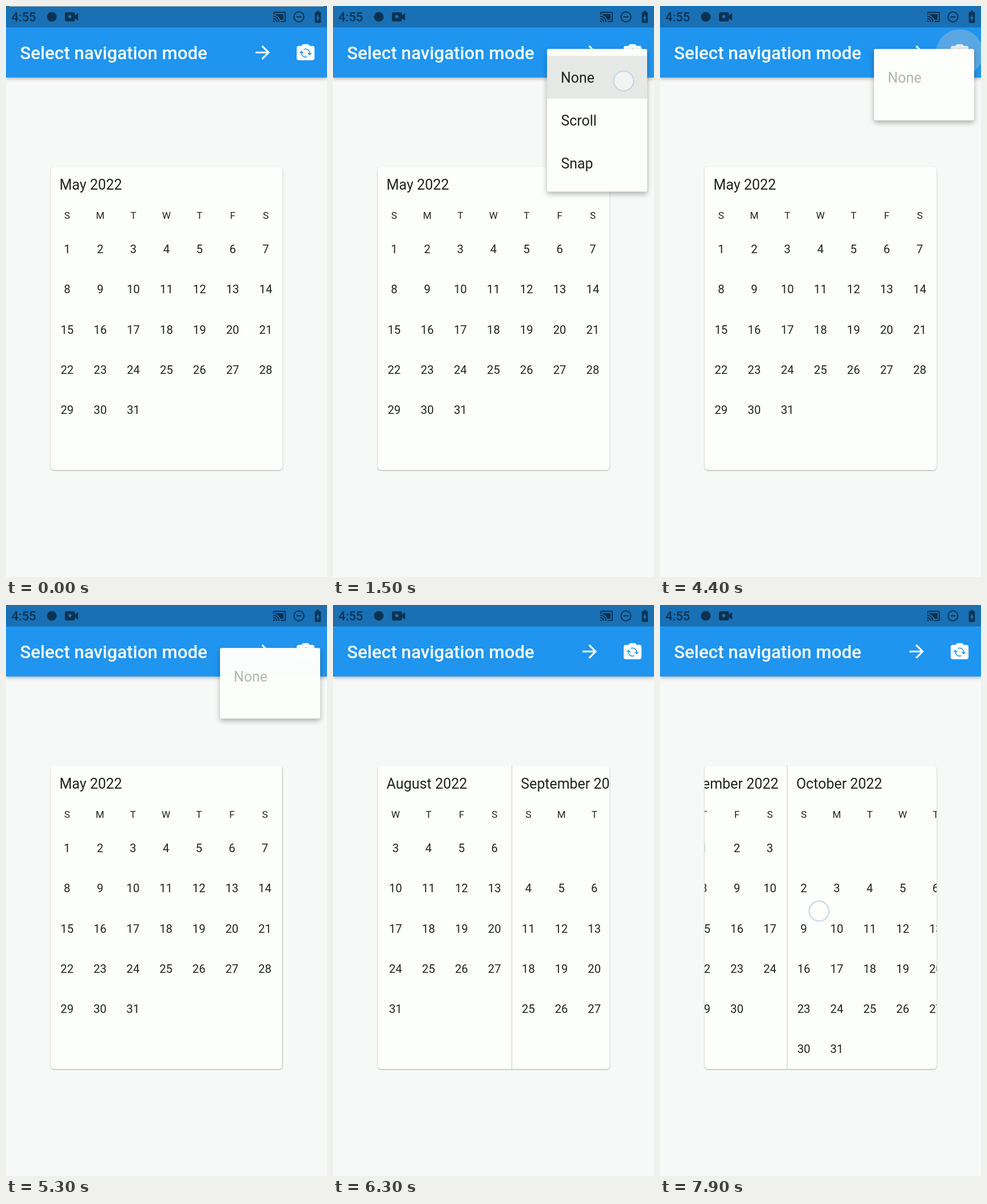
An HTML page for the animation above (8 s loop, 561 by 998 pixels).

```html
<!DOCTYPE html>
<html lang="en">
<head>
<meta charset="utf-8">
<title>Calendar navigation mode</title>
<style>
  html, body { margin: 0; width: 100%; height: 100%; overflow: hidden; background: #f7f9f8; }
  svg { display: block; width: 100%; height: 100%; font-family: Roboto, sans-serif; fill: #212221; }
  .card { fill: #fdfffc; filter: drop-shadow(0 1px 1.2px rgba(0,0,0,.32)); }
  .bar { fill: #1f95f0; filter: drop-shadow(0 2px 3px rgba(0,0,0,.3)); }
  .status { fill: #0d3250; }
  .white { fill: #fdfffe; }
  .mid { text-anchor: middle; }
  .menu { fill: #fdfffc; filter: drop-shadow(0 4px 5px rgba(0,0,0,.3)); }
</style>
</head>
<body>
<svg viewBox="0 0 561 998" preserveAspectRatio="none">
  <defs>
    <clipPath id="cardClip"><rect x="78" y="281" width="405.5" height="530" rx="6"/></clipPath>
    <clipPath id="barClip"><rect width="561" height="125"/></clipPath>
    <clipPath id="menuClip"><rect id="menuCut" y="75" rx="3"/></clipPath>
  </defs>

  <rect width="561" height="998" fill="#f7f9f8"/>
  <rect class="card" x="78" y="281" width="405.5" height="530" rx="6"/>
  <g id="months" clip-path="url(#cardClip)"></g>

  <rect class="bar" width="561" height="125"/>
  <rect width="561" height="37.5" fill="#1970b5"/>
  <rect id="edge" x="6" width="549" height="1" fill="#b4c3cf"/>
  <g class="status">
    <text x="9.500" y="27.300" font-size="21.800" font-weight="500">4:55</text>
    <circle cx="80" cy="19" r="8.500"/>
    <path fill-rule="evenodd" d="M106 11h11.500a3 3 0 0 1 3 3v2.500l5.500-4v13l-5.500-4v2.500a3 3 0 0 1-3 3H106a3 3 0 0 1-3-3V14a3 3 0 0 1 3-3zM111.500 15.500a3 3 0 1 0 .01 0z"/>
    <path transform="translate(466 7)" d="M1 18v3h3c0-1.660-1.340-3-3-3zm0-4v2c2.760 0 5 2.240 5 5h2c0-3.870-3.130-7-7-7zm18-7H5v1.630c3.960 1.280 7.090 4.410 8.370 8.370H19V7zM1 10v2c4.970 0 9 4.030 9 9h2c0-6.080-4.930-11-11-11zm20-7H3c-1.100 0-2 .9-2 2v3h2V5h18v14h-7v2h7c1.100 0 2-.9 2-2V5c0-1.100-.9-2-2-2z"/>
    <circle cx="512" cy="19" r="8.700" fill="none" stroke="#0d3250" stroke-width="1.900"/>
    <rect x="507.500" y="18" width="9" height="2"/>
    <path transform="translate(532.400 6.500) scale(1.050)" d="M15.670 4H14V2h-4v2H8.330C7.600 4 7 4.600 7 5.330v15.330C7 21.400 7.600 22 8.330 22h7.330c.74 0 1.340-.6 1.340-1.330V5.330C17 4.600 16.400 4 15.670 4zM11 20v-5.500H9L13 7v5.500h2L11 20z"/>
  </g>
  <g class="white">
    <text x="24.500" y="93" font-size="31.200" font-weight="500">Select navigation mode</text>
    <path transform="translate(430 62.600) scale(1.558)" d="M12 4l-1.410 1.410L16.170 11H4v2h12.170l-5.580 5.590L12 20l8-8z"/>
    <path transform="translate(504.900 62) scale(1.558)" d="M20 5h-3.170L15 3H9L7.170 5H4C2.900 5 2 5.900 2 7v12c0 1.100.9 2 2 2h16c1.100 0 2-.9 2-2V7C22 5.900 21.100 5 20 5zM12 18c-2.760 0-5-2.240-5-5H5l2.500-2.500L10 13H8c0 2.210 1.790 4 4 4 .58 0 1.130-.13 1.620-.35l.74.74C13.650 17.760 12.860 18 12 18zM16.500 15.500L14 13h2c0-2.210-1.790-4-4-4-.58 0-1.130.13-1.620.35L9.640 8.620C10.350 8.240 11.140 8 12 8c2.760 0 5 2.240 5 5h2L16.500 15.500z"/>
  </g>
  <circle id="ripple" cx="523.500" cy="82" fill="#c8c8c8" clip-path="url(#barClip)"/>

  <g id="menu">
    <rect id="menuBox" class="menu" y="75" rx="3"/>
    <g clip-path="url(#menuClip)">
      <rect id="press" x="374" width="175" height="75" fill="#e6e8e5"/>
      <g id="items" font-size="24.930"></g>
    </g>
  </g>

  <circle id="touch" r="17.300" fill="#fff" fill-opacity=".5" stroke="#c3d0e8" stroke-opacity=".85" stroke-width="2.300"/>
</svg>
<script>
const LOOP = 8000, STEP = 100;
const LEFT = 78, WIDTH = 405, PAD = 15.6, ROW = 70.15;
const $ = id => document.getElementById(id);
const clamp = v => Math.max(0, Math.min(1, v));
const span = (t, a, b) => clamp((t - a) / (b - a));

function set(el, attrs) {
  for (const key in attrs) el.setAttribute(key, attrs[key]);
}

function add(parent, tag, attrs, text) {
  const el = document.createElementNS('http://www.w3.org/2000/svg', tag);
  set(el, attrs);
  if (text !== undefined) el.textContent = text;
  return parent.appendChild(el);
}

// Months, from May 2022
const NAMES = ['May', 'June', 'July', 'August', 'September', 'October', 'November'];

const months = NAMES.map((name, i) => {
  const root = add($('months'), 'g', {});
  const cells = [];
  const cell = (col, y, size, text) => {
    const el = add(root, 'text', { y, 'font-size': size, class: 'mid' }, text);
    cells.push({ el, col });
  };
  [...'SMTWTFS'].forEach((day, col) => cell(col, 372, 17.1, day));
  const first = new Date(2022, 4 + i, 1).getDay();
  const count = new Date(2022, 5 + i, 0).getDate();
  for (let d = 1; d <= count; d++) {
    const n = first + d - 1;
    cell(n % 7, 432.2 + ROW * Math.floor(n / 7), 20.26, d);
  }
  const line = add(root, 'rect', { x: WIDTH - 1, y: 281, width: 1.5, height: 530, fill: '#d6d8d6' });
  const title = add(root, 'text', { y: 320.8, 'font-size': 24.93 }, name + ' 2022');
  return { root, cells, line, title };
});

let scrollMode = null;
function setMode(on) {
  if (on === scrollMode) return;
  scrollMode = on;
  const size = (on ? WIDTH - 1.6 : WIDTH) / 7;
  for (const m of months) {
    for (const c of m.cells) c.el.setAttribute('x', (c.col + .5) * size - .1);
    m.line.setAttribute('visibility', on ? 'inherit' : 'hidden');
  }
}

// Finger drag, then a decelerating fling
const DRAG = 392.9, FLING = 1495;
function offsetAt(t) {
  if (t < 5950) return DRAG * span(t, 5800, 5950) ** 1.5;
  const u = span(t, 5950, 7100);
  return DRAG + FLING * (1.2 * u ** 3 - 3.27 * u ** 2 + 3.065 * u);
}

function drawMonths(t) {
  setMode(t >= 5100);
  const offset = offsetAt(t);
  months.forEach((m, i) => {
    const x = i * WIDTH - offset;
    const shown = x > -WIDTH && x < WIDTH;
    m.root.setAttribute('display', shown ? 'inline' : 'none');
    if (!shown) return;
    m.root.setAttribute('transform', `translate(${LEFT + x} 0)`);
    // The title sticks to the left edge until the next month pushes it out
    const end = WIDTH - PAD - m.title.getComputedTextLength();
    m.title.setAttribute('x', Math.min(end, PAD + Math.max(0, -x)));
  });
}

// Popup menu
const UNIT = 1 / 4.5;
const items = ['None', 'Scroll', 'Snap'].map((label, i) =>
  add($('items'), 'text', { x: 399 - 1.8 * (i === 0), y: 133.7 + 75 * i }, label));
items[0].setAttribute('x', 398);
items[1].setAttribute('x', 398.5);
items[2].setAttribute('x', 398.5);

const popups = [
  { open: 500, close: 1500, press: 1400, item: 0 },
  { open: 4300, close: 5066, press: 5000, item: 1 }
];

function drawMenu(t) {
  const p = popups.find(q => t > q.open && t < q.close + 300);
  $('menu').setAttribute('display', p ? 'inline' : 'none');
  if (!p) return;
  const v = t < p.close ? span(t, p.open, p.open + 300)
                        : clamp((1 - (t - p.close) / 300) * 1.5);
  const width = 175 * clamp(v / UNIT);
  const box = { x: 549 - width, width, height: 249.5 * clamp(v / UNIT / 3) };
  set($('menuBox'), box);
  set($('menuCut'), box);
  $('menu').setAttribute('opacity', clamp(v * 3));
  items.forEach((el, i) => {
    const start = (i + 1) * UNIT;
    el.setAttribute('opacity', span(v, start, Math.min(1, start + 1.5 * UNIT)));
  });
  const glow = t < p.press ? 0 : 1 - span(t, p.close, p.close + 200);
  set($('press'), { y: 87 + 75 * p.item, opacity: glow });
}

// Touches: start, end, from x, y, to x, y
const touches = [
  [400, 600, 523, 84, 523, 84],
  [1400, 1600, 508, 131, 508, 131],
  [2400, 2700, 377, 556, 60, 568],
  [3000, 3300, 432, 556, 20, 567],
  [3400, 3700, 415, 560, 20, 567],
  [3800, 4000, 379, 545, 70, 551],
  [4200, 4400, 523, 84, 523, 84],
  [5000, 5200, 506, 204, 506, 204],
  [5700, 6000, 422, 550, -10, 555],
  [7800, 8000, 420, 530, 136, 540]
];

function drawTouch(t) {
  const hit = touches.find(([a, b]) => t >= a && t < b);
  $('touch').setAttribute('display', hit ? 'inline' : 'none');
  if (!hit) return;
  const [a, b, x0, y0, x1, y1] = hit;
  const u = span(t, a, b);
  set($('touch'), { cx: x0 + (x1 - x0) * u, cy: y0 + (y1 - y0) * u });
}

function drawRipple(t) {
  const age = t - (t < 4000 ? 400 : 4200);
  const on = age >= 0 && age < 600;
  set($('ripple'), {
    r: on ? 55 * span(age, -100, 300) : 0,
    opacity: on ? .35 * (1 - span(age, 250, 600)) : 0
  });
}

function draw(t) {
  $('edge').setAttribute('opacity', 1 - span(t, 0, 200));
  drawMonths(t);
  drawRipple(t);
  drawMenu(t);
  drawTouch(t);
}

const began = performance.now();
function tick() {
  const t = Math.max(0, performance.now() - began) % LOOP;
  draw(Math.floor(t / STEP) * STEP);
  requestAnimationFrame(tick);
}
tick();
</script>
</body>
</html>
```
